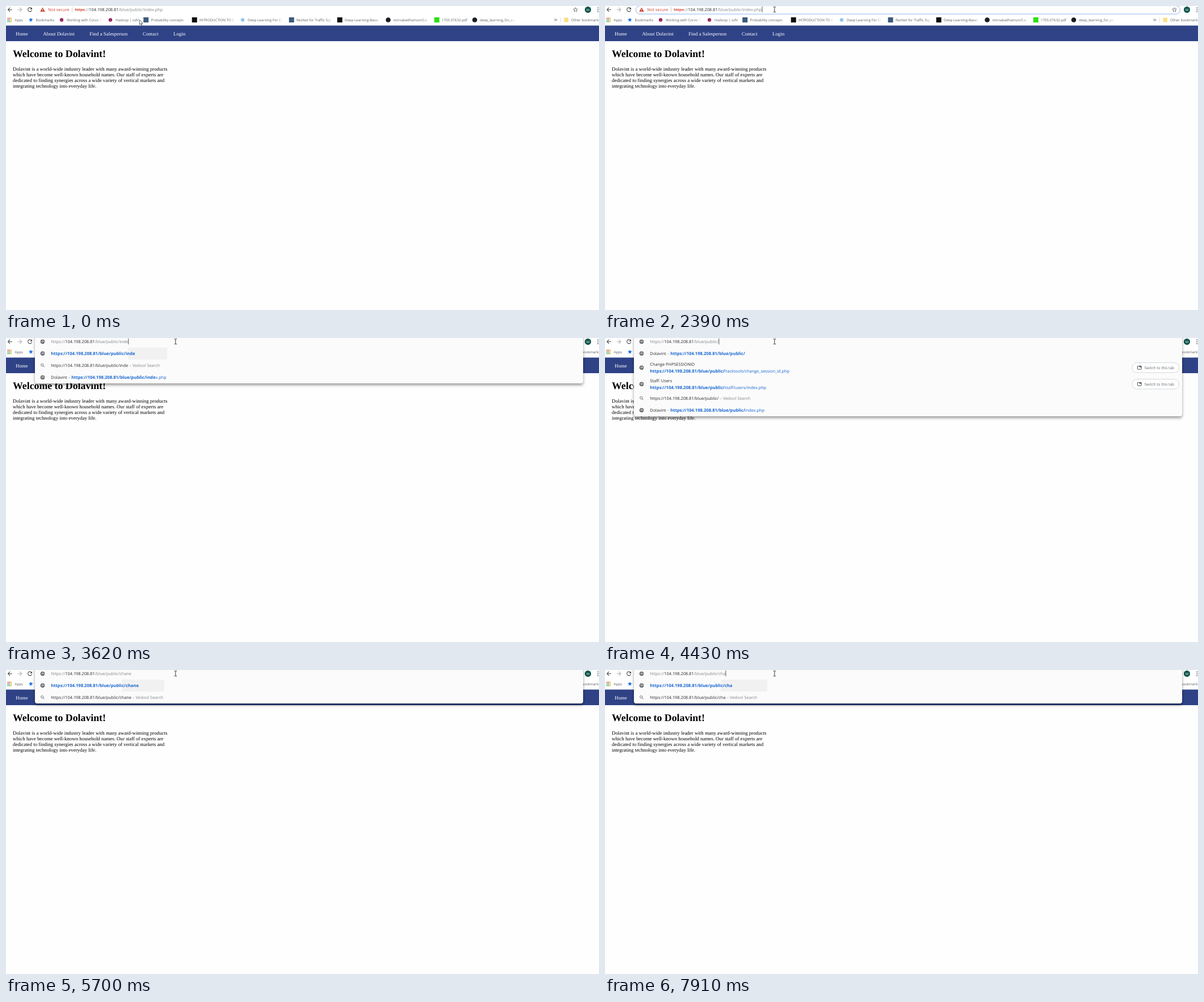
These frames come from a looping animation (1045x536 px, 8000 ms). An HTML page:

```html
<!DOCTYPE html>
<html lang="en">
<head>
<meta charset="utf-8">
<title>Address bar</title>
<style>
html, body { margin: 0; width: 100%; height: 100%; overflow: hidden; background: #fefefe; }
svg { display: block; }
text { white-space: pre; text-rendering: geometricPrecision; font: 7.35px "Open Sans", "Noto Sans", sans-serif; }
.mark { font-size: 6.2px; fill: #5a5d61; }
.page { font: 8.9px "Liberation Serif", serif; }
.title { font: bold 17.8px "Liberation Serif", serif; }
.small { font-size: 6.6px; fill: #5f6368; }
.link { fill: #1967d2; }
.hit { fill: #1967d2; font-weight: bold; font-size: 7.58px; }
.dim { fill: #80868b; }
.dark { fill: #2a2c2f; }
.panel { filter: drop-shadow(0 3px 2.5px rgba(0, 0, 0, .4)); }
</style>
</head>
<body>
<svg id="stage" width="1045" height="536" viewBox="0 0 1045 536">
  <defs>
    <linearGradient id="fade"><stop stop-color="#fff" stop-opacity="0"/><stop offset="1" stop-color="#fff"/></linearGradient>
    <clipPath id="sheet"><rect x="40" y="0" width="990" height="200"/></clipPath>
  </defs>
  <g id="base"></g>
  <g id="live"></g>
  <g id="pointer"></g>
</svg>
<script>
const $ = id => document.getElementById(id);
const BRAND = 'Dolavint', HOST = '104.198.208.81', PATH = '/blue/public/';
const ROOT = 'https://' + HOST + PATH;

const text = (x, y, body, cls = 'dark', more = '') => `<text x="${x}" y="${y}" class="${cls}" ${more}>${body}</text>`;
const span = (cls, body) => `<tspan class="${cls}">${body}</tspan>`;
const rect = (x, y, w, h, fill, more = '') => `<rect x="${x}" y="${y}" width="${w}" height="${h}" fill="${fill}" ${more}/>`;
const disc = (x, y, r, fill) => `<circle cx="${x}" cy="${y}" r="${r}" fill="${fill}"/>`;
const line = (d, color, width = 1, more = '') => `<path d="${d}" fill="none" stroke="${color}" stroke-width="${width}" ${more}/>`;

function star(x, y, r, style) {
  const points = Array.from({ length: 10 }, (_, i) => {
    const a = i * Math.PI / 5, k = i % 2 ? r * .45 : r;
    return `${x + k * Math.sin(a)},${y - k * Math.cos(a)}`;
  });
  return `<polygon points="${points.join(' ')}" ${style}/>`;
}

const globe = y => disc(64.5, y, 3.7, '#55595e') +
  line(`M62 ${y - 1.3}l2 1.1l-.4 2.4M64.6 ${y - 2.7}l.4 1.6l2 .9l-1.2 1.6`, '#fff', 1);
const lens = y => `<circle cx="63.7" cy="${y - .8}" r="2.1" fill="none" stroke="#5f6368" stroke-width=".9"/>` +
  line(`M65.3 ${y + .8}l2.3 2.3`, '#5f6368', 1);

// label, text x, icon shape, icon color
const bookmarks = [
  ['Working with Corvo Studio', 107, 'disc', '#9c2a63'],
  ['Hadoop | odV', 193, 'disc', '#9c2a63'],
  ['Probability concepts', 255.5, 'box', '#3c5a7c'],
  ['INTRODUCTION TO DATA', 341, 'box', '#0c0c0c'],
  ['Deep Learning For Computer', 426, 'disc', '#8ec8e8'],
  ['ResNet for Traffic Sign', 512, 'box', '#3c5a7c'],
  ['Deep Learning-Based Work', 597, 'box', '#0c0c0c'],
  ['mirnabedhamun/Cars', 682.5, 'disc', '#1b1f23'],
  ['1705.07632.pdf', 768, 'box', '#2be010'],
  ['deep_learning_for_cars', 835, 'disc', '#1b1f23']
];

function bookmark([label, x, shape, color]) {
  const r = color === '#1b1f23' ? 4.3 : 3.2;
  return (shape === 'box' ? rect(x - 13.3, 20, 9, 9, color) : disc(x - 9, 24.5, r, color)) +
    `<svg x="${x}" y="17" width="61" height="16">${text(0, 9.8, label, 'mark')}</svg>` +
    rect(x + 53, 17, 9, 15, 'url(#fade)');
}

function drawBase() {
  const colors = ['#ea4335', '#ea4335', '#fbbc05', '#34a853', '#4285f4', '#fbbc05', '#34a853', '#34a853', '#fbbc05'];
  const apps = colors.map((c, i) => rect(2.6 + i % 3 * 2.9, 20.7 + Math.floor(i / 3) * 2.9, 1.9, 1.9, c)).join('');
  const nav = [['Home', 17], ['About ' + BRAND, 65.3], ['Find a Salesperson', 147.2], ['Contact', 241], ['Login', 295]];
  const body = [
    BRAND + ' is a world-wide industry leader with many award-winning products',
    'which have become well-known household names. Our staff of experts are',
    'dedicated to finding synergies across a wide variety of vertical markets and',
    'integrating technology into everyday life.'
  ];
  $('base').innerHTML =
    rect(0, 0, 1045, 536, '#fefefe') + rect(0, 0, 1045, 34.5, '#fff') +
    line('M10.8 6.5H3.6M7 3L3.5 6.5L7 10', '#4a4d51', 1.1) +
    line('M20.5 6.5H27.7M24.3 3L27.8 6.5L24.3 10', '#b4b6b9', 1.1) +
    line('M45 4.4A3.5 3.5 0 1 0 45.4 7.5', '#4a4d51', 1.1) +
    '<path d="M46 2.4v3.6h-3.6z" fill="#4a4d51"/>' +
    disc(1025.5, 6.5, 5.5, '#0a4f46') + text(1025.5, 8.7, 'M', '', 'text-anchor="middle" fill="#fff" style="font-size:6px"') +
    [3.3, 6.6, 9.9].map(y => disc(1043.2, y, .9, '#4a4d51')).join('') +
    apps + text(15.5, 26.8, 'Apps', 'mark') +
    star(43.8, 24.5, 4, 'fill="#1a73e8"') + text(52.5, 26.8, 'Bookmarks', 'mark') +
    bookmarks.map(bookmark).join('') +
    line('M966.6 22.6l1.8 1.9l-1.8 1.9M969 22.6l1.8 1.9l-1.8 1.9', '#3c4043', .9) +
    rect(977, 20, .8, 9, '#d5d7da') +
    rect(983.5, 20.5, 7.5, 8, '#fbdf85', 'rx=".8"') + text(996, 26.8, 'Other bookmarks', 'mark') +
    rect(0, 34.5, 1045, 27.5, '#2f4286') +
    nav.map(([s, x]) => text(x, 51.7, s, 'page', 'fill="#fff"')).join('') +
    text(12, 90, `Welcome to ${BRAND}!`, 'title') +
    body.map((s, i) => text(12, 114.3 + i * 10, s, 'page')).join('');
}

function addressBar(s) {
  const file = PATH + 'index.php';
  const url = s.selected
    ? '<tspan fill="#fff"><tspan text-decoration="line-through">https</tspan>://' + HOST + file + '</tspan>'
    : '<tspan fill="#d23f31" text-decoration="line-through">https</tspan>' + span('dim', '://') + span('dark', HOST) + span('dim', file);
  return rect(54.5, -.4, 959, 14.6, s.fill, `rx="7.3" stroke="${s.focus ? '#8fb6ee' : 'none'}"`) +
    '<path d="M64.5 2.6L68.8 10H60.2z" fill="#d23f31"/>' + rect(64.1, 5, .9, 2.4, '#fff') + rect(64.1, 8.1, .9, .9, '#fff') +
    text(74.3, 9.2, 'Not secure', '', 'fill="#d23f31"') + rect(116.3, 2, .8, 9, '#b9bcc0') +
    star(1003.5, 6.7, 4, 'fill="none" stroke="#55595e" stroke-width=".8"') +
    (s.selected ? rect(121, 1, 156, 11.5, '#0b74d4') : '') +
    text(121.3, 9.2, url, '', 'id="url"');
}

const named = (y, hit, rest = '') => globe(y) +
  text(79.3, y + 2.7, BRAND + span('dim', ' – ') + span('hit', hit) + span('link', rest));
const search = (y, query) => lens(y) + text(79.3, y + 2.7, query + span('dim', ' – Vedool Search'));
const openTab = (y, title, rest) => globe(y) + text(79.3, y - 3.2, title) +
  text(79.3, y + 8.9, span('hit', ROOT) + span('link', rest)) +
  rect(928.7, y - 8.6, 83, 17.4, '#fff', 'rx="8.7" stroke="#cfd2d6" stroke-width=".9"') +
  rect(938.4, y - 2.8, 6.8, 5.8, 'none', 'rx=".6" stroke="#50545a"') + rect(941.7, y - 2.8, 3.5, 2.2, '#50545a') +
  text(950.5, y + 2.5, 'Switch to this tab', 'small');

function dropdown(s) {
  const query = ROOT + s.typed, isIndex = s.typed && 'index.php'.startsWith(s.typed);
  const height = !s.typed ? 138 : isIndex ? 80 : 59;
  let rows;
  if (!s.typed) {
    rows = named(27.2, ROOT) + openTab(52.2, 'Change PHPSESSIONID', 'hacktools/change_session_id.php') +
      openTab(81.2, 'Staff: Users', 'staff/users/index.php') + search(106.2, query) + named(127.2, ROOT, 'index.php');
  } else {
    rows = (s.shade ? rect(s.shade[0], 17, s.shade[1] - s.shade[0], 21, '#f1f1f1') : '') +
      globe(27.2) + text(79.3, 29.9, query, 'hit') + search(48.3, query) +
      (isIndex ? named(69.4, query, 'index.php'.slice(s.typed.length)) : '');
  }
  return `<g clip-path="url(#sheet)"><g class="panel">${rect(51, -10, 966, height + 10, '#fbfbfb', 'rx="4"')}</g></g>` +
    globe(6.5) + text(79.3, 9.2, span('dim', 'https://') + span('dark', HOST) + span('dim', PATH + s.typed), '', 'id="url"') + rows;
}

function pointer(x) {
  return x
    ? line(`M${x - 2.3} 1.8h1.6l.7 .6l.7 -.6h1.6M${x} 2.2v8M${x - 2.3} 10.7h1.6l.7 -.6l.7 .6h1.6`, '#222', .9)
    : '<path d="M235.3 24.6v8.2l1.9-1.8l1.4 3l1.3-.6l-1.4-2.9h2.6z" fill="#fff" stroke="#222" stroke-width=".7"/>';
}

// each step changes part of the state before it
const steps = [
  [0, { x: 0, fill: '#fff' }],
  [130, { x: 269.5 }],
  [390, { x: 285, fill: '#f6f7f8' }],
  [520, { x: 299.5, fill: '#f1f3f4' }],
  [820, { fill: '#fff', focus: 1, selected: 1 }],
  [1320, { selected: 0, caret: 1 }],
  [1590, { x: 298.8 }],
  [1840, { caret: 0 }],
  [2390, { caret: 1 }],
  [2670, { typed: 'index.ph' }],
  [2790, { typed: 'index.' }],
  [2940, { typed: 'index', shade: [220, 284] }],
  [3350, { caret: 0 }],
  [3490, { typed: 'inde', caret: 1, shade: [215, 284] }],
  [3760, { typed: 'ind', shade: [211, 284] }],
  [3880, { typed: 'in', shade: [207, 284] }],
  [4030, { typed: 'i', shade: [202, 284] }],
  [4430, { typed: '', shade: null }],
  [4710, { typed: 'c' }],
  [4860, { typed: 'cha', shade: [204, 275] }],
  [4990, { typed: 'chan' }],
  [5270, { typed: 'chane', shade: [204, 279] }],
  [5700, { caret: 0 }],
  [5830, { typed: 'chaneg', caret: 1, shade: [204, 282] }],
  [6100, { typed: 'chanege', shade: [204, 286] }],
  [6500, { caret: 0 }],
  [7060, { typed: 'chaneg', caret: 1 }],
  [7200, { typed: 'chane' }],
  [7360, { typed: 'chan' }],
  [7910, { typed: 'cha' }]
];

let shown = -1;
function frame(now) {
  const t = now % 8000, index = steps.findLastIndex(([at]) => at <= t);
  if (index !== shown) {
    shown = index;
    const s = Object.assign({}, ...steps.slice(0, index + 1).map(step => step[1]));
    $('live').innerHTML = s.typed === undefined ? addressBar(s) : dropdown(s);
    const url = $('url');
    const end = +url.getAttribute('x') + url.getComputedTextLength();
    $('pointer').innerHTML = (s.caret ? rect(end + .2, .8, .8, 10.4, '#333') : '') + pointer(s.x);
  }
  requestAnimationFrame(frame);
}

drawBase();
frame(0);
</script>
</body>
</html>
```
